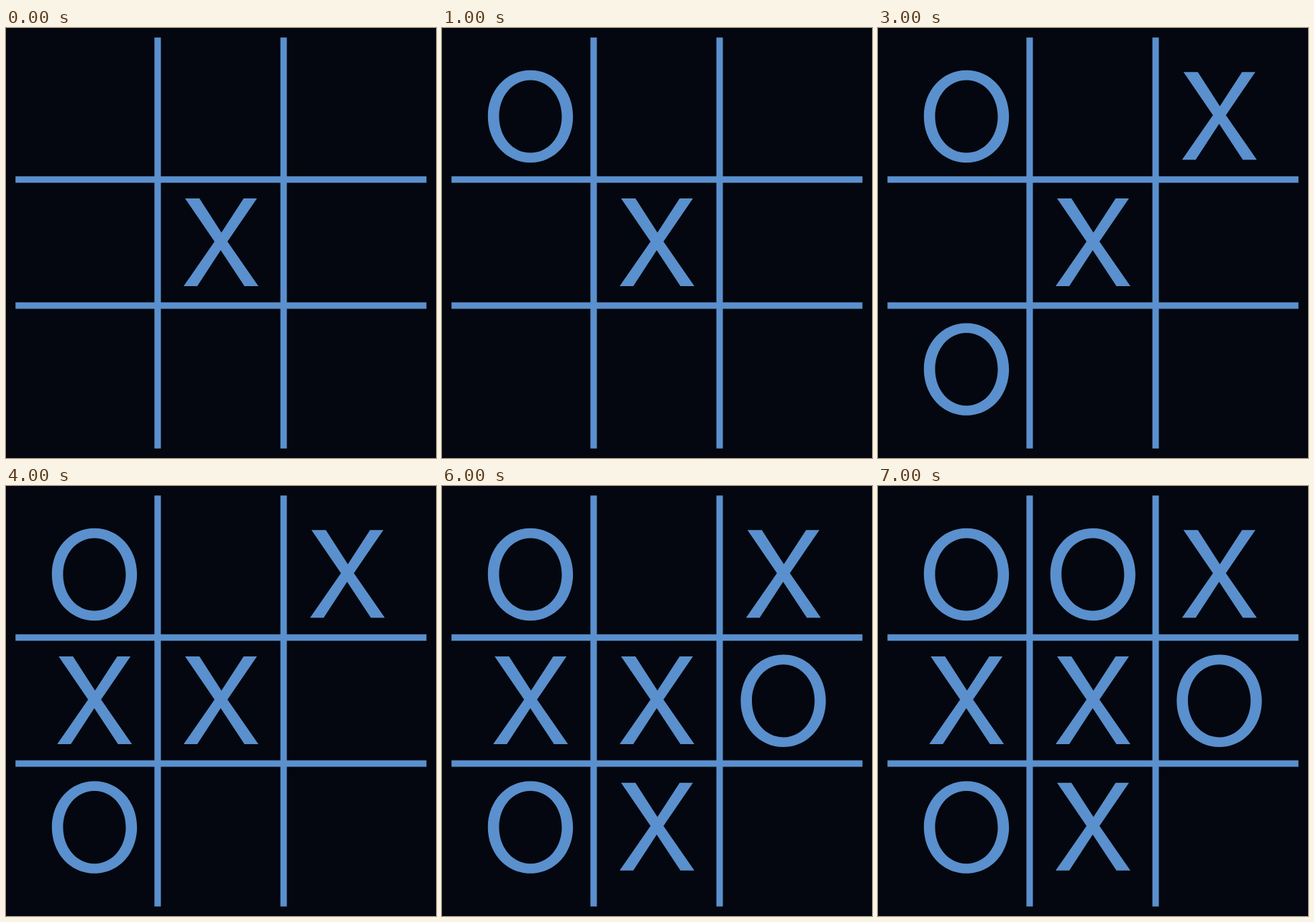
Write an HTML page that moves like this. It is 598 by 598 pixels and loops after 8000 ms.

```html
<!DOCTYPE html>
<html lang="en">
<head>
<meta charset="utf-8">
<title>Noughts and crosses</title>
<style>
  html, body { margin: 0; width: 100%; height: 100%; overflow: hidden; background: #04070f; }
  svg { display: block; width: 100vw; height: 100vh; }
</style>
</head>
<body>
<svg viewBox="0 0 598 598">
  <rect width="598" height="598" fill="#04070f"/>
  <path d="M210.9 13.2V584.7M386.1 13.2V584.7M13.2 210.8H584.7M13.2 386H584.7"
        fill="none" stroke="#5a90cd" stroke-width="9"/>
  <g id="marks" fill="#5a90cd" fill-rule="evenodd"></g>
</svg>
<script>
const STEP = 1000, LOOP = 8000, PITCH = 175.8;

// Moves in order of play: mark, column and row relative to the centre cell
const moves = [
  ['X', 0, 0], ['O', -1, -1], ['X', 1, -1], ['O', -1, 1],
  ['X', -1, 0], ['O', 1, 0], ['X', 0, 1], ['O', 0, -1]
];

// Closed oval around the middle of the centre cell
function oval(rx, ry) {
  const c = 298.8, k = 0.565, p = (x, y) => `${c + x * rx} ${c + y * ry} `;
  return 'M' + p(0, -1) +
    'C' + p(k, -1) + p(1, -k) + p(1, 0) +
    'C' + p(1, k) + p(k, 1) + p(0, 1) +
    'C' + p(-k, 1) + p(-1, k) + p(-1, 0) +
    'C' + p(-1, -k) + p(-k, -1) + p(0, -1) + 'Z';
}

const shapes = {
  X: 'M249 237H269L299.6 284.5L330.5 237H349L308 297L351 359H331.6L298.6 309L266 359H247L290 297Z',
  O: oval(59.2, 64.2) + oval(43.6, 50.6)
};

const layer = document.getElementById('marks');
const marks = moves.map(([mark, col, row]) => {
  const el = document.createElementNS('http://www.w3.org/2000/svg', 'path');
  el.setAttribute('d', shapes[mark]);
  el.setAttribute('transform', `translate(${col * PITCH} ${row * PITCH})`);
  return layer.appendChild(el);
});

function draw(time) {
  const t = time % LOOP;
  marks.forEach((el, i) => el.setAttribute('visibility', t >= i * STEP ? 'visible' : 'hidden'));
}

const start = performance.now();
function tick() {
  draw(performance.now() - start);
  requestAnimationFrame(tick);
}
tick();
</script>
</body>
</html>
```
